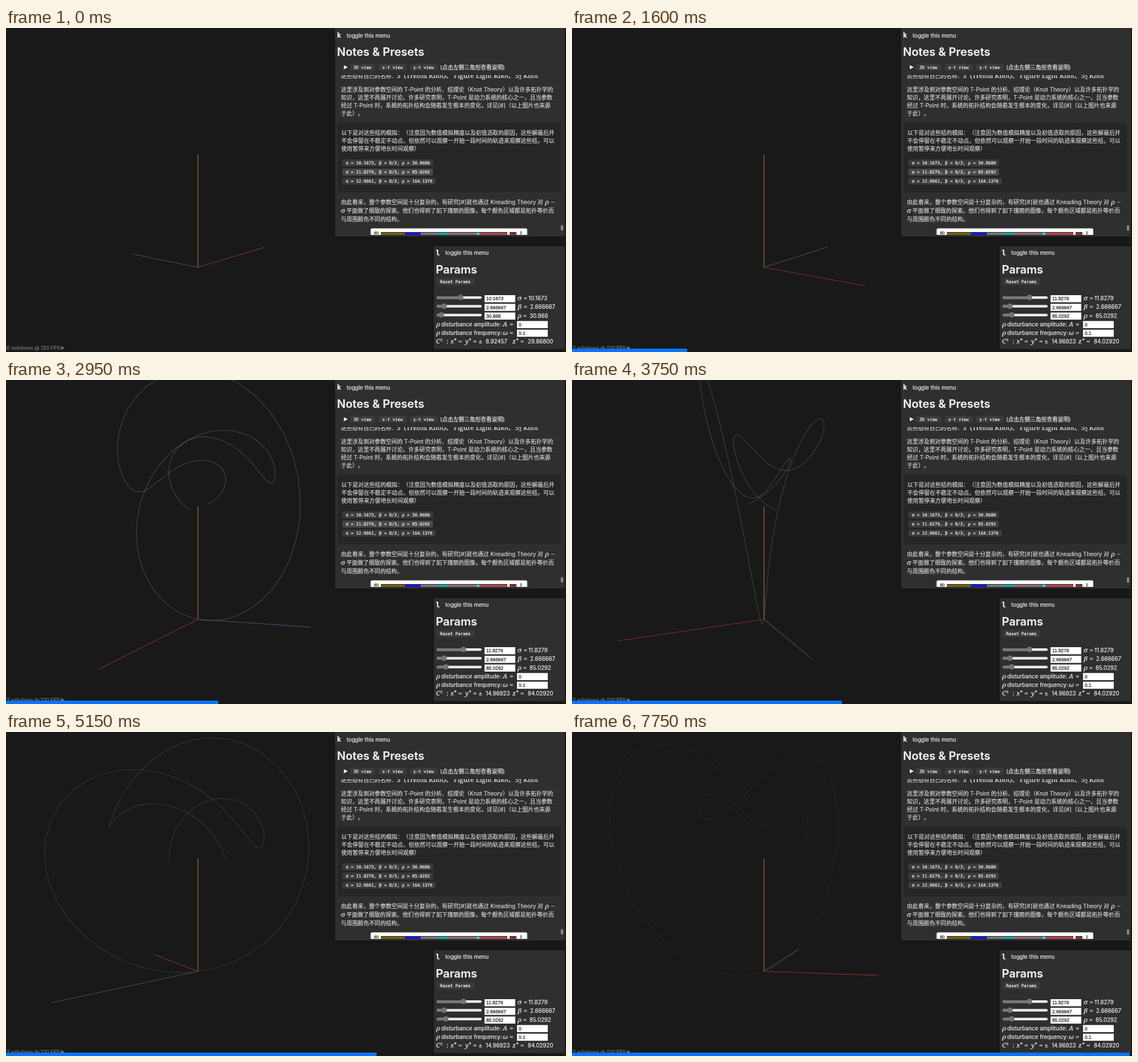
These frames come from a looping animation (983 by 570 pixels, 7800 ms). An HTML page with a canvas:

```html
<!DOCTYPE html>
<html lang="zh-CN">
<head>
<meta charset="utf-8">
<style>
html, body { margin: 0; width: 100%; height: 100%; overflow: hidden; background: #191919; }
canvas, svg { position: absolute; left: 0; top: 0; }
text {
  font: 9.7px Inter, 'Noto Sans CJK SC', 'Noto Sans CJK', sans-serif;
  fill: #f0f0f0; stroke: #f0f0f0; stroke-width: .2; white-space: pre; text-spacing-trim: space-all;
}
.cjk { font-size: 9.85px; fill: #e4e4e4; stroke: #e4e4e4; stroke-width: .12; }
.head { font-size: 20px; font-weight: 600; }
.key { font: bold 12px 'DejaVu Sans Mono', monospace; fill: #fff; }
.code { font: 7.45px 'DejaVu Sans Mono', monospace; fill: #fff; }
.math { font: italic 11.5px 'Noto Serif', 'Liberation Serif', serif; }
.serif { font: 11.5px 'Noto Serif', 'Liberation Serif', serif; }
.field, .fig { font: 8.3px 'Liberation Sans', Arial, sans-serif; fill: #111; stroke: #111; }
.fig { font-size: 7px; }
.status { font-size: 8.8px; font-weight: 600; fill: #747474; stroke: none; }
</style>
</head>
<body>
<canvas id="view" width="983" height="570"></canvas>
<svg id="ui" width="983" height="570"></svg>
<script>
const LOOP = 7800, PARAMS_AT = 700, SPAWN_AT = 1200, TRAIL_AT = 1550, HOVER_END = 3400, FADE = 7500;
const $ = id => document.getElementById(id);
const ui = $('ui'), ctx = $('view').getContext('2d');

// ---- static interface ----
const text = (x, y, s, cls = '', id = '') => `<text x="${x}" y="${y}" class="${cls}" id="${id}">${s}</text>`;
const rect = (x, y, w, h, fill, r = 0, id = '') =>
  `<rect x="${x}" y="${y}" width="${w}" height="${h}" rx="${r}" fill="${fill}" id="${id}"/>`;
const shadow = (...box) => `<g filter="url(#soft)">${rect(...box, '#141414', 2)}</g>`;
const chip = (x, y, w, s, id) => rect(x, y, w, 12, '#3b3b3b', 2.5, id) + text(x + 6, y + 8.8, s, 'code');
const lines = (x, y, step, list) => list.map((s, i) => text(x, y + i * step, s, 'cjk')).join('');
const starred = (x, s) => text(x, 555, s + '<tspan font-size="8" dy="-2">*</tspan>', 'math');
const slider = (y, id) => rect(756, y - 2, 79, 4.5, '#e9e9e9', 2.2) +
  rect(756, y - 2, 20, 4.5, '#777', 2.2, id + 'Fill') + `<circle id="${id}Knob" cy="${y}" r="4.8" fill="#747474"/>`;
const field = (x, y, id, s = '') => rect(x, y, 54, 12.5, '#fff') + text(x + 3, y + 9.4, s, 'field', id);
const strip = [[658, 700, '#75620a'], [700, 728, '#1616e0'], [728, 757, '#77777d'], [757, 776, '#1ca5a5'],
  [776, 826, '#8b6f78'], [826, 831, '#20e0e0'], [831, 880, '#b24450'], [884, 896, '#8c3520']];

ui.innerHTML = `
<defs>
  <clipPath id="scroll"><rect x="577" y="83" width="404" height="281"/></clipPath>
  <filter id="soft" x="-10%" y="-10%" width="120%" height="120%"><feGaussianBlur stdDeviation="1.5"/></filter>
</defs>` +
  shadow(577, -4, 405, 372) + shadow(750, 383, 232, 183) +
  rect(577.5, -4, 403.5, 371, '#2f2f2f', 2) + rect(751, 384, 230, 181, '#2f2f2f', 2) +
  text(581, 17, 'k', 'key') + text(598, 16.5, 'toggle this menu') +
  text(581, 48.5, 'Notes &amp; Presets', 'head') +
  '<path d="M593 65.5L600 69L593 72.5Z" fill="#fff"/>' +
  chip(604, 63, 44, '3D view') + chip(654.5, 63, 48.5, 'x-t view') + chip(709, 63, 48.5, 'y-t view') +
  text(762, 72.5, '(点击左侧三角形查看说明)') +
  '<g clip-path="url(#scroll)">' +
  text(588, 88, '这些结有自己的名称：', 'cjk') + text(686, 88, '3  (Trefoil Knot)、', 'serif') +
  text(786, 88, 'Figure Eight Knot、', 'serif') +
  text(894, 88, '5<tspan font-size="8" dy="2">2</tspan><tspan dy="-2"> Knot</tspan>', 'serif') +
  lines(588, 111.5, 14, [
    '这里涉及到对参数空间的 T-Point 的分析、结理论（Knot Theory）以及许多拓扑学的',
    '知识，这里不再展开讨论。许多研究表明，T-Point 是动力系统的核心之一，且当参数',
    '经过 T-Point 时，系统的拓扑结构会随着发生根本的变化，详见[#]（以上图片也来源',
    '于此）。']) +
  rect(582, 167, 392, 122, '#262626', 2) +
  lines(588.5, 188, 14.1, [
    '以下是对这些结的模拟：（注意因为数值模拟精度以及初值选取的原因，这些解最后并',
    '不会停留在不稳定不动点，但依然可以观察一开始一段时间的轨迹来观察这些结，可以',
    '使用暂停来方便地长时间观察）']) +
  chip(590.5, 231.3, 159, 'σ = 10.1673, β = 8/3, ρ = 30.8680') +
  chip(590.5, 247.4, 159, 'σ = 11.8279, β = 8/3, ρ = 85.0292', 'hover') +
  chip(590.5, 263.5, 164, 'σ = 12.9661, β = 8/3, ρ = 164.1376') +
  text(588, 310, '由此看来，整个参数空间是十分复杂的，有研究[#]就也通过 Kneading Theory 对', 'cjk') +
  text(946, 310, 'ρ −', 'math') + text(588, 325, 'σ', 'math') +
  lines(597.5, 325, 14.7, ['平面做了细致的探索。他们也得到了如下瑰丽的图像，每个颜色区域都是拓扑等价而']) +
  lines(588, 339.7, 14.7, ['与周围颜色不同的结构。']) +
  rect(640, 352.5, 275, 20, '#fff', 3) + rect(658, 359, 238, 6, '#222') +
  strip.map(([a, b, c]) => rect(a, 360, b - a, 6, c)).join('') + rect(880, 359, 4, 6, '#fff') +
  text(646, 362.5, '80', 'fig') + text(902, 362.5, '2', 'fig') + '</g>' +
  rect(974, 346.5, 4, 10, '#8a8a8a', 2) +

  text(754.5, 399.5, 'l', 'key') + text(771, 399.3, 'toggle this menu') +
  text(754.5, 431.5, 'Params', 'head') + chip(756, 440, 66, 'Reset Params') +
  slider(474, 's') + slider(489.3, 'b') + slider(504.7, 'r') +
  field(840, 470, 'sIn') + field(840, 485.2, 'bIn', '2.666667') + field(840, 500.5, 'rIn') +
  text(898, 479, 'σ', 'math') + text(908.5, 479, '=', 'serif') + text(917, 479, '', '', 'sOut') +
  text(898, 494, 'β', 'math') + text(908.5, 494, '=', 'serif') + text(920, 494, '2.666667') +
  text(898, 509.5, 'ρ', 'math') + text(907.5, 509.5, '=', 'serif') + text(919, 509.5, '', '', 'rOut') +
  text(755, 524.8, 'ρ', 'math') + text(764, 524.8, 'disturbance amplitude:') +
  text(872, 524.8, 'A', 'math') + text(884, 524.8, '=', 'serif') + field(897, 515.5, '', '0') +
  text(755, 540, 'ρ', 'math') + text(764, 540, 'disturbance frequency:') +
  text(872, 540, 'ω', 'math') + text(884, 540, '=', 'serif') + field(897, 530.7, '', '0.1') +
  text(755, 555, 'C<tspan font-size="8" dy="-4">±</tspan>', 'math') + text(773, 555, ':', 'serif') +
  starred(780, 'x') + text(794, 555, '=', 'serif') + starred(806, 'y') + text(820, 555, '= ±', 'serif') +
  text(842, 555, '', '', 'cxy') + starred(889, 'z') + text(903, 555, '=', 'serif') + text(916, 555, '', '', 'cz') +
  text(1, 566, '', 'status', 'count') + '<path d="M96.5 559.5L103 563L96.5 566.5Z" fill="#747474"/>' +
  rect(0, 564, 0, 6, '#0a74f5', 0, 'bar');

function setParams(changed) {
  const p = changed ? { s: 11.8279, r: 85.0292, sx: 803, rx: 772 } : { s: 10.1673, r: 30.868, sx: 798, rx: 764 };
  const place = (id, x) => {
    $(id + 'Knob').setAttribute('cx', x);
    $(id + 'Fill').setAttribute('width', x - 756);
  };
  place('s', p.sx); place('b', 769); place('r', p.rx);
  $('sIn').textContent = $('sOut').textContent = p.s;
  $('rIn').textContent = $('rOut').textContent = p.r;
  $('cxy').textContent = Math.sqrt((p.r - 1) * 8 / 3).toFixed(5);
  $('cz').textContent = (p.r - 1).toFixed(5);
}

// ---- Lorenz trajectory leaving the origin and ending at a fixed point ----
const S = 11.8279, B = 8 / 3, R = 85.0292, DT = 0.001, KEEP = 4;
const flow = ([x, y, z]) => [S * (y - x), x * (R - z) - y, x * y - B * z];
const add = (p, q, k) => p.map((c, i) => c + q[i] * k);
function step(p) {
  const a = flow(p), b = flow(add(p, a, DT / 2)), c = flow(add(p, b, DT / 2)), d = flow(add(p, c, DT));
  return p.map((v, i) => v + DT / 6 * (a[i] + 2 * b[i] + 2 * c[i] + d[i]));
}
function trajectory() {
  const lambda = (-(S + 1) + Math.sqrt((S - 1) ** 2 + 4 * S * R)) / 2, c = Math.sqrt(B * (R - 1));
  const path = [];
  let p = [0.05, 0.05 * (lambda + S) / S, 0];
  for (let i = 0; i < 1700; i++) {
    if (i % KEEP === 0) path.push(p);
    if (Math.hypot(Math.abs(p[0]) - c, Math.abs(p[1]) - c, p[2] - R + 1) < 0.4) break;
    p = step(p);
  }
  return path;
}
const path = trajectory();

// ---- level camera turning about the vertical axis ----
const DIST = 211.4, UNIT = 2.335, AXIS = 85;
function camera(t) {
  const a = (149.2 - 0.055 * t) * Math.PI / 180, sin = Math.sin(a), cos = Math.cos(a);
  return (x, y, z) => {
    const w = 1 / (1 - (x * cos - y * sin) / DIST);
    return [491.5 + (UNIT * (x * sin + y * cos) - 154.5) * w, 285 + (136 - UNIT * z) * w];
  };
}
function line(p, q, color, width) {
  ctx.strokeStyle = color;
  ctx.lineWidth = width;
  ctx.beginPath();
  ctx.moveTo(...p);
  ctx.lineTo(...q);
  ctx.stroke();
}

function drawView(t) {
  const project = camera(t), origin = project(0, 0, 0);
  ctx.clearRect(0, 0, 983, 570);
  for (const sign of [1, -1]) {
    let last = null;
    for (let i = 0; i < path.length; i++) {
      const age = t - TRAIL_AT - i * KEEP * DT * 1000;
      if (age < 0) break;
      const [x, y, z] = path[i], p = project(sign * x, sign * y, z);
      if (last) line(last, p, `rgba(225,230,222,${0.27 * (1 - age / FADE)})`, 1.1);
      last = p;
    }
  }
  line(origin, project(AXIS, 0, 0), '#84342c', 1.1);
  line(origin, project(0, AXIS, 0), '#4c4e70', 1.1);
  line(origin, project(0, 0, AXIS), '#9a6838', 1.3);
}

const start = performance.now();
let shown = null;
function frame() {
  const t = (performance.now() - start) % LOOP, changed = t >= PARAMS_AT;
  if (changed !== shown) setParams(shown = changed);
  $('count').textContent = `${t < SPAWN_AT ? 0 : 2} solutions @ 120 FPS`;
  $('hover').setAttribute('fill', t < HOVER_END ? '#494949' : '#3b3b3b');
  $('bar').setAttribute('width', t * 0.1263);
  drawView(t);
  requestAnimationFrame(frame);
}
frame();
</script>
</body>
</html>
```
